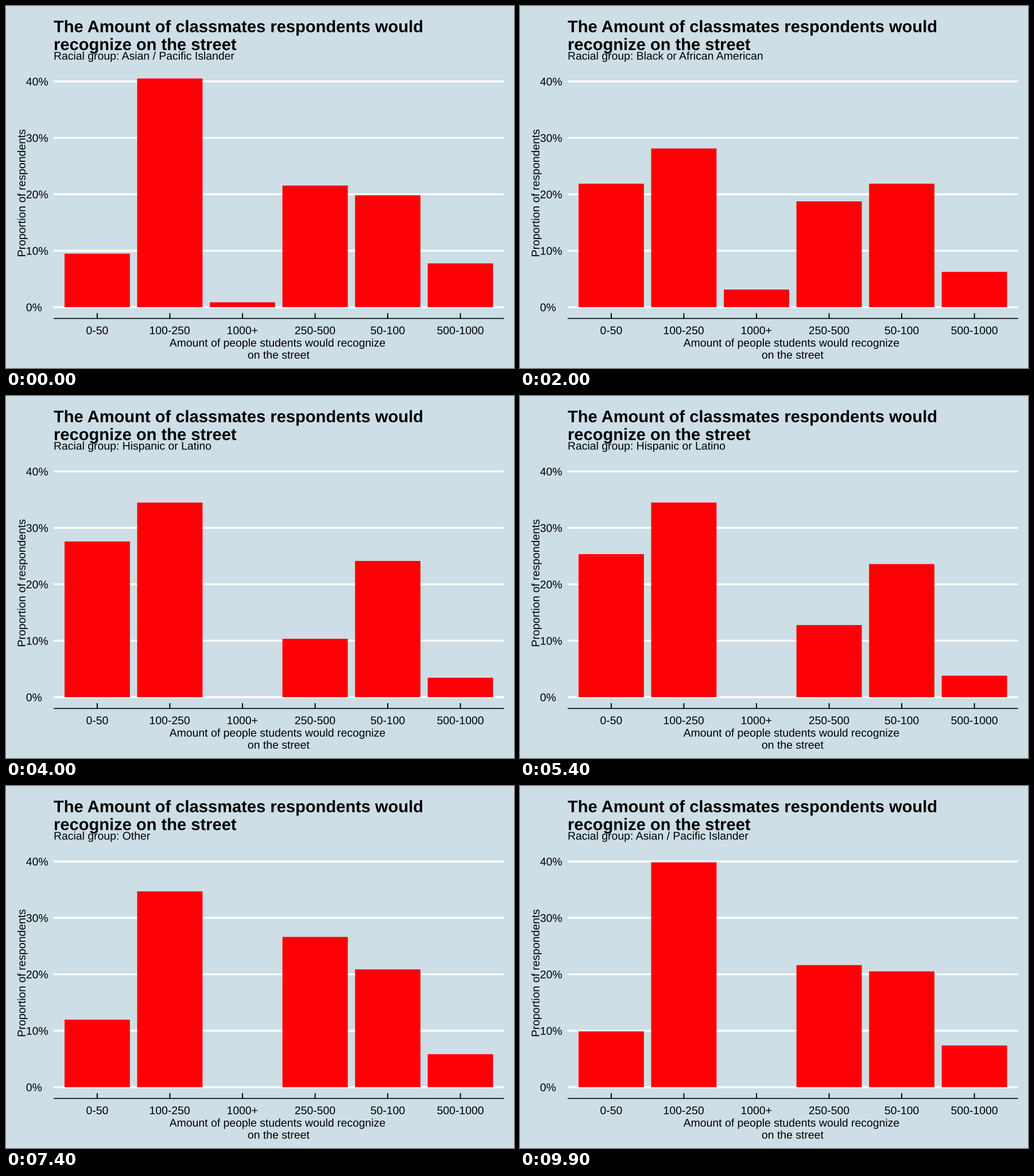
Write a matplotlib script that moves like this. It is 885 px wide and 632 px high and loops after 10000 ms.

```python
import numpy as np
import matplotlib.pyplot as plt
from matplotlib.animation import FuncAnimation
from matplotlib.patches import PathPatch, Rectangle
from matplotlib.textpath import TextPath
from matplotlib.transforms import Affine2D

W, H, DPI = 885, 632, 100
LEFT, RIGHT = 83, 867.5          # panel edges in pixels
ZERO, UNIT = 525.8, 9.853        # y of 0 %, pixels per percent
AXIS = 545.5
STEP = (RIGHT - LEFT) / 6.2
BASE = 19.4
HOLD, MOVE = 13, 7               # frames per state
CYCLE = HOLD + MOVE

BINS = ["0-50", "100-250", "1000+", "250-500", "50-100", "500-1000"]
COUNTS = {
    "Asian / Pacific Islander": [11, 47, 1, 25, 23, 9],
    "Black or African American": [14, 18, 2, 12, 14, 4],
    "Hispanic or Latino": [8, 10, 0, 3, 7, 1],
    "Other": [10, 29, 0, 23, 17, 5],
    "White": [19, 55, 0, 34, 38, 8],
}
GROUPS = list(COUNTS)
SHARES = [100 * np.array(c) / sum(c) for c in COUNTS.values()]

fig = plt.figure(figsize=(W / DPI, H / DPI), dpi=DPI, facecolor="#cddee6")
ax = fig.add_axes([0, 0, 1, 1])
ax.set(xlim=(0, W), ylim=(H, 0))
ax.axis("off")


def text_path(x, y, s, size=BASE, weight="normal", center=False, turn=0):
    """Outline of s with its baseline at pixel (x, y)."""
    prop = {"family": "Liberation Sans", "weight": weight}
    path = TextPath((0, 0), s, size=size, prop=prop)
    box = path.get_extents()
    shift = -(box.x0 + box.x1) / 2 if center else 0
    place = Affine2D().translate(shift, 0).scale(1, -1).rotate_deg(-turn)
    return place.translate(x, y).transform_path(path)


def write(*args, **kw):
    return ax.add_patch(PathPatch(text_path(*args, **kw), fc="black", lw=0, zorder=4))


def line(xs, ys, color, px, z):
    ax.plot(xs, ys, color=color, lw=px * 72 / DPI, zorder=z,
            solid_capstyle="butt", snap=False)


write(LEFT, 45.7, "The Amount of classmates respondents would", 29.1, "bold")
write(LEFT, 76.9, "recognize on the street", 29.1, "bold")
write(472.5, 594.6, "Amount of people students would recognize", center=True)
write(475.2, 615.6, "on the street", center=True)
write(33.8, 326.2, "Proportion of respondents", center=True, turn=90)

for pct in range(0, 50, 10):
    y = ZERO - pct * UNIT
    line([LEFT, RIGHT], [y, y], "white", 3.4, 1)
    write(34.8, y + 7, f"{pct}%")

line([LEFT, RIGHT], [AXIS, AXIS], "black", 1.6, 3)
bars = []
for i, name in enumerate(BINS):
    x = LEFT + (0.6 + i) * STEP
    line([x, x], [536.3, AXIS], "black", 1.9, 3)
    write(x, 573, name, center=True)
    bar = Rectangle((x - 0.45 * STEP, ZERO), 0.9 * STEP, 0,
                    fc="#fd0006", lw=0, zorder=2, snap=False)
    bars.append(ax.add_patch(bar))

captions = [text_path(LEFT, 93.6, "Racial group: " + g) for g in GROUPS]
caption = ax.add_patch(PathPatch(captions[0], fc="black", lw=0, zorder=4))


def draw(frame):
    state, k = divmod(frame, CYCLE)
    after = (state + 1) % len(GROUPS)
    t = max(0, k - HOLD) / MOVE
    a, b = SHARES[state], SHARES[after]
    # bars missing from one state appear or vanish only at the end
    heights = np.where(a * b > 0, a + (b - a) * t, a)
    for bar, h in zip(bars, heights):
        bar.set_height(-h * UNIT)
        bar.set_visible(h > 0)
    caption.set_path(captions[state if t < 0.5 else after])
    return [*bars, caption]


anim = FuncAnimation(fig, draw, frames=CYCLE * len(GROUPS), interval=100,
                     repeat=True, repeat_delay=0, blit=False)
plt.show()
```
